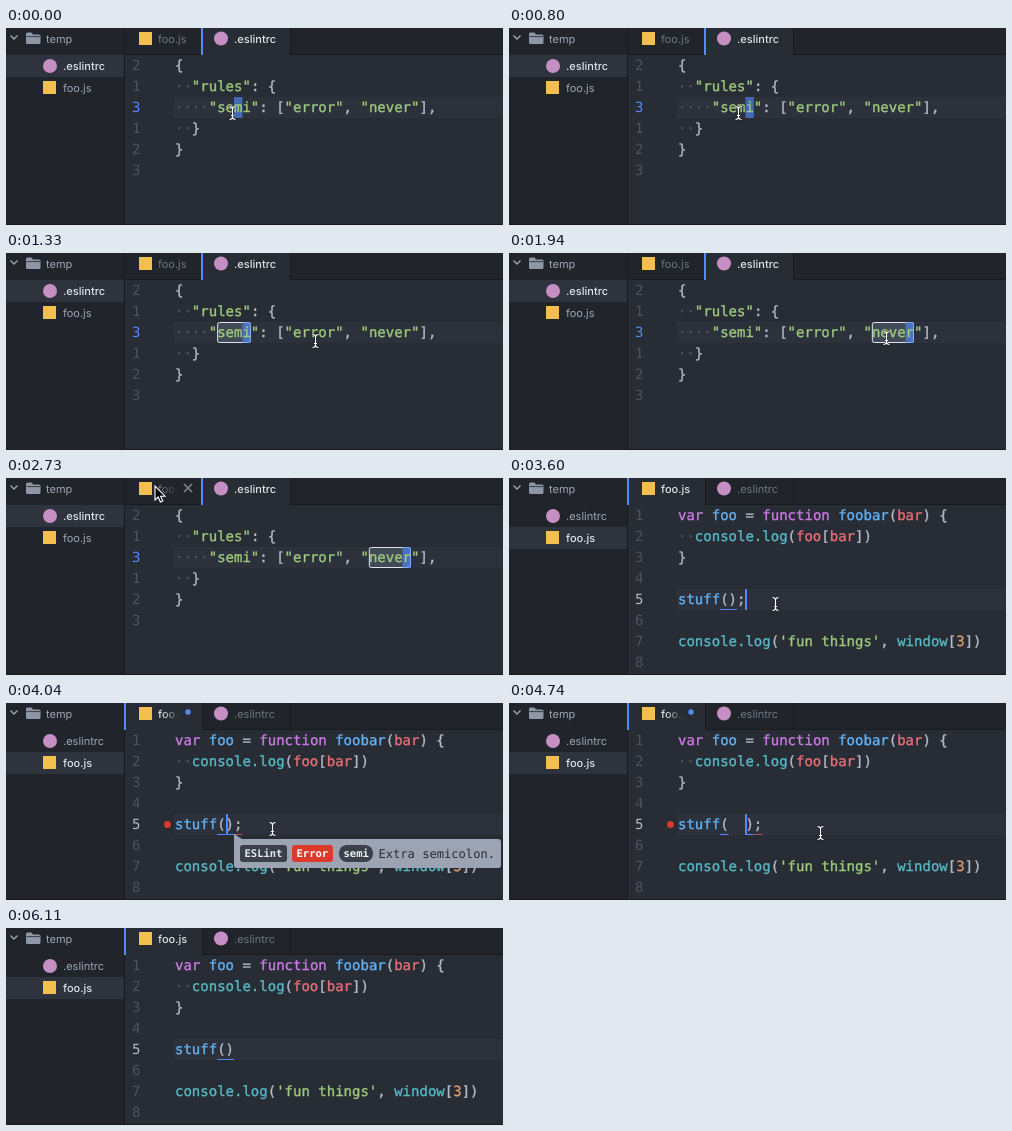
Recreate the animation shown at these times as an HTML page. Size 497 by 197 pixels, loop 6210 ms.

```html
<!DOCTYPE html>
<html lang="en">
<head>
<meta charset="utf-8">
<title>Linting in an editor</title>
<style>
  html, body { margin: 0; width: 100%; height: 100%; overflow: hidden; background: #282c34; }
  svg { display: block; }
  text { white-space: pre; text-rendering: geometricPrecision; }
  .code, .number { font: 14px "DejaVu Sans Mono", monospace; }
  .code tspan { stroke: currentColor; stroke-width: .35px; }
  .ui { font: 11px Inter, sans-serif; }
  .strong { font: 500 11px Inter, sans-serif; }
  .badge { font: bold 10.5px "DejaVu Sans Mono", monospace; }
  .message { font: 12.1px "DejaVu Sans Mono", monospace; }
</style>
</head>
<body>
<svg id="stage" width="497" height="197" viewBox="0 0 497 197"></svg>
<script>
const LOOP = 6210, COL = 8.428, LEFT = 169, TOP = 27, ROW = 21;
const SIDE = 119, TAB_2 = 196, TABS_END = 284;
const C = {
  side: '#21252b', editor: '#282c34', line: '#2c313c', selectedRow: '#2e333e', border: '#181a1f',
  text: '#b4bbc7', dim: '#6e7582', label: '#9da5b4', bright: '#e0e3e8', faint: '#4b5363',
  accent: '#528bff', purple: '#cc7be4', blue: '#63b3f6', cyan: '#56bac6', red: '#e96f79',
  green: '#9dca7c', orange: '#d89e6b', error: '#dc3a2c',
  jsIcon: '#f5bf4f', lintIcon: '#c58fc4'
};

// Pointer positions, each held until the next: [ms, x, y]
const pointer = [
  [0, 227, 85], [270, 229, 86], [350, 230, 85],
  [1240, 262, 87], [1330, 310, 88], [1410, 350, 89], [1500, 374, 90], [1590, 383, 89],
  [1670, 381, 87], [1760, 378, 85],
  [2210, 332, 63], [2300, 240, 32], [2380, 172, 14], [2470, 148, 8],
  [2640, 149, 9], [2730, 149, 8], [2900, 168, 32], [2990, 208, 76], [3070, 242, 108],
  [3160, 261, 122], [3240, 267, 126],
  [4570, 280, 128], [4660, 300, 131], [4740, 312, 130],
  [5370, 345, 152], [5450, 395, 190], [5540, -50, -50]
];

// Call text and caret column: [ms, arguments and ending, caret]
const typing = [
  [0, '()', 7], [3600, '();', 8], [3960, '();', 7], [4040, '();', 6],
  [4220, '( );', 7], [4390, '(  );', 8], [4830, '()', 7]
];

const at = (steps, t) => steps.filter(s => s[0] <= t).pop();
const within = (t, from, to) => t >= from && t < to;
const colX = col => LEFT + col * COL;
const rowY = row => TOP + row * ROW;

const rect = (x, y, w, h, fill, more = '') =>
  `<rect x="${x}" y="${y}" width="${w}" height="${h}" fill="${fill}" ${more}/>`;
const circle = (x, y, r, fill) => `<circle cx="${x}" cy="${y}" r="${r}" fill="${fill}"/>`;
const path = (d, stroke, width, more = '') =>
  `<path d="${d}" fill="none" stroke="${stroke}" stroke-width="${width}" ${more}/>`;
const label = (x, y, text, fill, cls = 'ui', more = '') =>
  `<text class="${cls}" x="${x}" y="${y}" fill="${fill}" ${more}>${text}</text>`;
const title = (x, y, text, active, idle, more) =>
  label(x, y, text, active ? C.bright : idle, active ? 'strong' : 'ui', more);

// Colours apply in turn to the parts separated by "|"
function codeLine(row, source, colors) {
  const names = colors.split(' ');
  const spans = source.split('|').map((part, i) =>
    `<tspan fill="${C[names[i]]}" color="${C[names[i]]}">${part}</tspan>`).join('');
  return label(LEFT, rowY(row) + 15, spans, C.text, 'code');
}
const lineNumbers = (numbers, active, activeColor) => numbers.map((n, row) =>
  label(126, rowY(row) + 15, n, row === active ? activeColor : C.faint, 'number')).join('');
const activeLine = row => rect(LEFT - 1, rowY(row), 498 - LEFT, ROW, C.line);
const blockCursor = col => rect(colX(col), 69, COL, ROW, C.accent, 'opacity=".62"');
const underline = (col, color = C.accent) => rect(colX(col), 131, COL, 1, color);

function sidebar(lintActive) {
  return rect(0, 0, SIDE - 1, 197, C.side)
    + rect(0, lintActive ? 27 : 49, SIDE - 1, 22, C.selectedRow)
    + rect(SIDE - 1, 0, 1, 197, C.border)
    + path('M4.5 7.5 L8 11 L11.5 7.5', C.label, 1.4)
    + `<path d="M20 6 q0-1.5 1.5-1.5 h4 l1.5 2 h6 q1.5 0 1.5 1.5 v6.5 q0 1.5-1.5 1.5 h-11.5 q-1.5 0-1.5-1.5z" fill="#8f97a6"/>`
    + path('M20.5 8.6 H34', C.side, .8)
    + label(40, 14.5, 'temp', C.label)
    + circle(44, 38, 7, C.lintIcon)
    + title(57, 42, '.eslintrc', lintActive, C.label)
    + rect(37, 53, 13, 13, C.jsIcon)
    + title(57, 64, 'foo.js', !lintActive, C.label);
}

function tabs(lintActive, hover, modified) {
  const x = lintActive ? TAB_2 : SIDE;
  const end = lintActive ? TABS_END : TAB_2;
  let out = rect(SIDE, 0, 497 - SIDE, 27, C.side) + rect(SIDE, 26, 497 - SIDE, 1, C.border)
    + rect(TAB_2, 0, 1, 27, C.border) + rect(TABS_END, 0, 1, 27, C.border)
    + rect(x, 0, end - x, 27, C.editor) + rect(x - 1, 0, 2, 27, C.accent)
    + rect(133, 4, 13, 13, C.jsIcon)
    + title(152, 14.5, 'foo.js', !lintActive, C.dim, hover || modified ? 'mask="url(#fade)"' : '')
    + circle(215, 10.5, 7, C.lintIcon)
    + title(228, 14.5, '.eslintrc', lintActive, C.dim);
  if (modified) out += circle(182, 9, 2.7, '#568af2');
  else if (hover) out += path('M178 6 l8 8 m0 -8 l-8 8', '#7d8492', 1.6);
  return out;
}

function configFile(t) {
  const cursor = t < 800 ? 7 : t < 1850 ? 8 : t < 1940 ? 25 : 27;
  const selected = within(t, 980, 1850) ? [5, 4] : t >= 1940 ? [23, 5] : null;
  const outlined = within(t, 1070, 1850) || t >= 1940;
  let out = activeLine(2);
  if (selected) {
    const x = colX(selected[0]), w = selected[1] * COL;
    out += rect(x, 69, w, ROW, '#434a57');
    if (outlined) out += rect(x + .5, 69.5, w - 1, ROW - 1, 'none', 'rx="2" stroke="#dfe3ea"');
  }
  return out + blockCursor(cursor) + lineNumbers([2, 1, 3, 1, 2, 3], 2, C.accent)
    + codeLine(0, '{', 'text')
    + codeLine(1, '··|"rules"|: {', 'faint green text')
    + codeLine(2, '····|"semi"|: [|"error"|, |"never"|],', 'faint green text green text green text')
    + codeLine(3, '··|}', 'faint text')
    + codeLine(4, '}', 'text');
}

function scriptFile(t) {
  const [, ending, caret] = at(typing, t);
  const close = 5 + ending.indexOf(')');
  const blinkOff = within(t, 5370, 5720) || t >= 6110;
  let out = activeLine(4) + lineNumbers([1, 2, 3, 4, 5, 6, 7, 8], 4, C.text)
    + codeLine(0, 'var |foo| = |function |foobar|(|bar|) {', 'purple blue text purple blue text red text')
    + codeLine(1, '··|console.log|(|foo|[|bar|])', 'faint cyan text red text red text')
    + codeLine(2, '}', 'text')
    + codeLine(4, 'stuff|' + ending, 'blue text')
    + codeLine(6, "console.log|(|'fun things'|, |window|[|3|])", 'cyan text green text cyan text orange text');
  if (!within(t, 3690, 3960)) out += underline(5) + underline(close);
  if (within(t, 3960, 4830)) out += underline(close + 1, '#a3545c') + circle(161.5, 121.5, 3.4, C.error);
  if (!blinkOff) out += rect(Math.round(colX(caret)), 111, 2, ROW, C.accent);
  if (within(t, 3960, 4130)) out += tooltip();
  return out;
}

function tooltip() {
  return `<path d="M228 131 L236 136 H492 q3 0 3 3 V162 q0 3-3 3 H231 q-3 0-3-3z" fill="#9ca3b2"/>`
    + rect(234, 142, 47, 17, '#3b404b', 'rx="3"') + label(238.5, 154, 'ESLint', '#e4e7ec', 'badge')
    + rect(286, 142, 41, 17, C.error, 'rx="3"') + label(290.5, 154, 'Error', '#fff', 'badge')
    + rect(333, 142, 34, 17, '#3b404b', 'rx="8"') + label(337.5, 154, 'semi', '#f0f2f5', 'badge')
    + label(372.5, 154.5, 'Extra semicolon.', '#282c34', 'message');
}

function pointerShape(x, y) {
  if (y < 27 && x > 0) {
    return `<path transform="translate(${x} ${y})" d="M0 0 V14 L3.2 11 L5.4 16 L7.8 15 L5.6 10.2 H10z" fill="#000" stroke="#fff" stroke-width="1.1"/>`;
  }
  const beam = 'M-3 -6.5 q2.5 0 3 2 q.5-2 3-2 M0 -5 v10 M-3 6.5 q2.5 0 3-2 q.5 2 3 2 M-1.5 2.5 h3';
  return `<g transform="translate(${x - .5} ${y})">`
    + path(beam, '#1c1f25', 2.4, 'opacity=".6"') + path(beam, '#fff', 1.1) + '</g>';
}

const defs = `<defs><linearGradient id="ramp" gradientUnits="userSpaceOnUse" x1="156" x2="174" y1="0" y2="0">
  <stop stop-color="#fff"/><stop offset="1" stop-color="#000"/></linearGradient>
  <mask id="fade" maskUnits="userSpaceOnUse" x="150" y="0" width="40" height="27">
  ${rect(150, 0, 40, 27, 'url(#ramp)')}</mask></defs>`;

function render(t) {
  const [, x, y] = at(pointer, t);
  const lintActive = t < 2820;
  const hover = y < 27 && within(x, SIDE, TAB_2);
  return defs + rect(0, 0, 497, 197, C.editor)
    + (lintActive ? configFile(t) : scriptFile(t))
    + sidebar(lintActive)
    + tabs(lintActive, hover, within(t, 3960, 4830))
    + rect(0, 196, 497, 1, C.border)
    + pointerShape(x, y);
}

const stage = document.getElementById('stage');
const start = performance.now();
let shown = '';
function tick() {
  const picture = render((performance.now() - start) % LOOP);
  if (picture !== shown) stage.innerHTML = shown = picture;
  requestAnimationFrame(tick);
}
tick();
</script>
</body>
</html>
```
